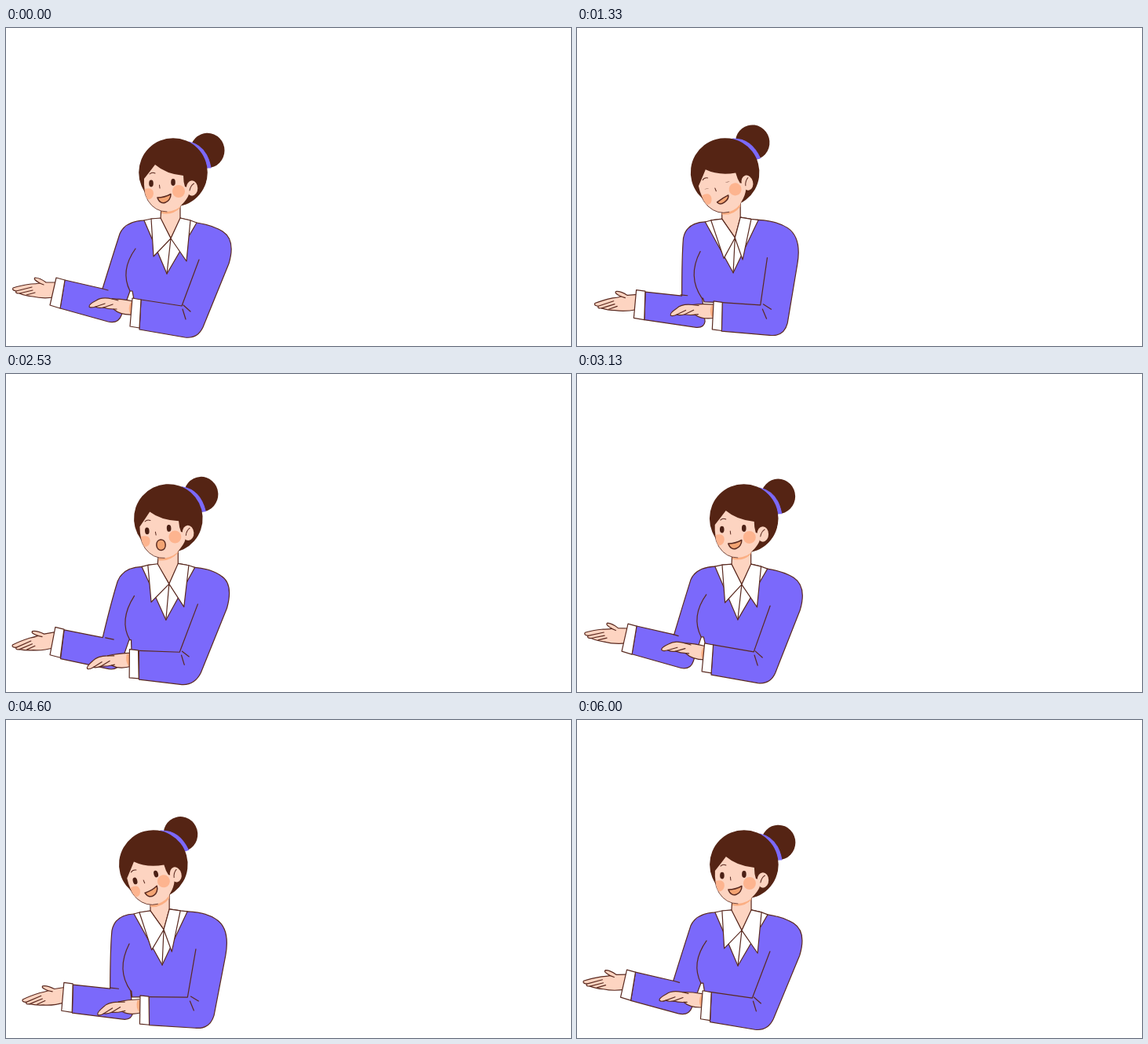
Animation of 720 by 405 pixels, one loop 6060 ms. Source, as an HTML page:

```html
<!DOCTYPE html>
<html lang="en">
<head>
<meta charset="utf-8">
<title>Presenter</title>
<style>
  html, body { margin: 0; width: 100%; height: 100%; overflow: hidden; background: #fff; }
  svg { display: block; width: 100vw; height: 100vh; }
  path, ellipse, circle { stroke-linejoin: round; stroke-linecap: round; }
</style>
</head>
<body>
<svg id="stage" viewBox="0 0 720 405"></svg>
<script>
const NS = 'http://www.w3.org/2000/svg';
const PURPLE = '#7b69fb', LINE = '#5a2a20', HAIR = '#552414', SKIN = '#fdd4c1', BLUSH = '#fdb48f', SHADE = '#fbae82';
const PERIOD = 3030;
const stage = document.getElementById('stage');

function make(parent, tag, attrs) {
  const el = document.createElementNS(NS, tag);
  for (const key in attrs) el.setAttribute(key, attrs[key]);
  return parent.appendChild(el);
}
const draw = (parent, d, fill = 'none', stroke = LINE, width = 1.2) =>
  make(parent, 'path', { d, fill, stroke, 'stroke-width': width });

// Weighted blend of paths that share the same commands.
const NUMBER = /-?\d+(\.\d+)?/g;
function blend(paths, weights) {
  const values = paths.map(p => p.match(NUMBER).map(Number));
  let i = 0;
  return paths[0].replace(NUMBER, () => {
    const v = values.reduce((sum, list, k) => sum + list[i] * weights[k], 0);
    i++;
    return v.toFixed(2);
  });
}

// Every moving shape has three poses: leaning right, swinging back, leaning left.
const morphs = [];
function morph(fill, stroke, ...poses) {
  morphs.push({ el: draw(stage, poses[0], fill, stroke), poses });
}

// Rigid parts move by [dx, dy, angle] about a centre.
const rigids = [];
function rigid(cx, cy, ...poses) {
  const el = make(stage, 'g', {});
  rigids.push({ el, cx, cy, poses });
  return el;
}

// Body and sleeves
morph(PURPLE, LINE,
  'M176 245Q152 246 145 262Q136 290 123 332L75 321L69 357L130 374Q143 377 147 366L158 335L161 335L163 346L172 346L170 384L228 394Q244 396 251 381L284 300Q293 270 276 259Q263 251 243 248Z',
  'M170 246Q146 247 141 264Q136 290 130 335L84 327L80 362L146 378Q157 379 158 370L160 338L162 338L165 341L183 343L180 381L245 391Q261 393 265 378L284 302Q291 271 273 258Q259 250 237 247Z',
  'M163 247Q139 248 135 268Q133 290 133 342L86 337L85 373L148 381Q160 383 162 374L159 345L160 345L161 352L183 352L183 388L242 392Q261 394 266 376L280 300Q286 266 268 254Q255 245 231 244Z');
morph('none', LINE,
  'M123 332L130 334M165 281Q145 309 158 335',
  'M126 334L131 335M161 282Q143 310 159 338',
  'M133 341L143 342M157 285Q140 318 159 345');
morph('none', LINE,
  'M172 346L224 354L246 295M226 353L235 361M225 358L229 371',
  'M183 343L233 353L245 295M235 352L245 360M234 358L239 371',
  'M183 352L232 353L242 292M236 352L246 358M235 358L240 370');

// Shirt, neck and collar
morph('#fff', LINE,
  'M176 245L185 243L222 242L235 245L243 248L205 313Z',
  'M170 246L179 244L215 242L228 245L237 247L202 312Z',
  'M163 247L170 245L208 241L222 243L231 244L199 312Z');
morph(SKIN, LINE,
  'M198 226L197 243L210 268L222 243L222 222',
  'M192 226L192 243L206 268L215 242L215 222',
  'M184 228L184 243L201 267L208 241L208 220');
morph(SHADE, 'none',
  'M198 226L198 236Q212 239 222 229L222 222Z',
  'M192 226L192 236Q206 239 215 229L215 222Z',
  'M184 228L184 238Q199 239 208 227L208 220Z');
morph('#fff', LINE,
  'M185 243L188 291L210 268L197 242ZM222 242L210 268L230 297L235 245ZM210 268L205 313',
  'M179 244L190 293L206 268L192 243ZM215 242L206 268L220 296L228 245ZM206 268L202 312',
  'M170 245L186 293L201 267L184 243ZM208 241L201 267L211 295L222 243ZM201 267L199 312');

// Far hand and cuff
const farHand = rigid(66, 337, [0, 0, 0], [10, 6.5, 5.5], [13, 16, -8]);
draw(farHand, 'M64 324L51 324Q43 318 37 318Q34 320 43 325Q38 326 32 326Q18 328 9 331Q7 334 13 335Q11 338 17 338Q24 341 34 342Q46 345 62 343', SKIN);
draw(farHand, 'M43 325L48 327M13 335L33 330M17 338L34 334M26 340L37 337');
const farCuff = rigid(66, 337, [0, 0, 0], [10, 6.5, -3.5], [13, 16, -8]);
draw(farCuff, 'M64 318L75 321L69 357L56 353Z', '#fff');

// Near hand and cuff
const nearHand = rigid(165, 363, [0, 0, 0], [11.2, -3, 7], [12, 6, -12]);
draw(nearHand, 'M162 348Q147 345 135 345Q122 342 115 347Q105 352 106 355Q108 357 114 355Q117 357 124 356Q130 358 137 358Q146 366 162 365', SKIN);
draw(nearHand, 'M114 355L126 351M124 356L136 352M137 358L141 358M135 345L143 347');
draw(nearHand, 'M159 349Q155 357 158 364L163 364L163 349Z', SHADE, 'none');
const nearCuff = rigid(165, 363, [0, 0, 0], [11.2, -3, 2.5], [12, 6, -3.5]);
draw(nearCuff, 'M161 344L172 346L170 382L158 380Z', '#fff');

// Head
const head = make(stage, 'g', {});
make(head, 'ellipse', { cx: 256.7, cy: 156, rx: 21.8, ry: 22.3, fill: HAIR });
draw(head, 'M233 145Q256 150 261 178L255.5 178Q251 156 233 150Z', PURPLE, PURPLE, 1);
make(head, 'circle', { cx: 213, cy: 184, r: 43.8, fill: HAIR });
draw(head, 'M176 192Q175 207 181 220Q190 234 205 234Q218 233 224 225Q231 218 233 212L231 203L228 202Q226 196 226 188Q204 186 190 174Q184 182 176 192Z', SKIN, 'none');
draw(head, 'M176 206Q177 213 181 220Q190 234 205 234', 'none', LINE, 0.8);
make(head, 'ellipse', { cx: 237, cy: 204, rx: 7.3, ry: 9.7, fill: SKIN });
draw(head, 'M239.500 198Q235 201 234 207', 'none', LINE, 1);
make(head, 'circle', { cx: 220, cy: 208, r: 8, fill: BLUSH });
draw(head, 'M176.500 205Q188 202 188 211Q187 219 180 218Q177 212 176.500 205Z', BLUSH, 'none');
draw(head, 'M183 186Q186 183 190 185M195.500 200L196 204', 'none', LINE, 1);
const eyes = [[185, 198], [213, 196.5]].map(([cx, cy]) =>
  make(head, 'ellipse', { cx, cy, rx: 2.8, ry: 4.4, fill: '#4b2015' }));
const mouth = draw(head, 'M0 0', '#f3a473', LINE, 1.5);
mouth.setAttribute('transform', 'translate(201.5 217)');

const oval = (w, h, tilt = 0) => {
  const k = h * 1.33;
  return `M${-w} ${tilt}C${-w} ${tilt - k} ${w} ${-tilt - k} ${w} ${-tilt}C${w} ${k - tilt} ${-w} ${k + tilt} ${-w} ${tilt}Z`;
};
const smile = 'M-8.5 -1C-3 -1 4 -3 8.5 -5.5C9 5 -5 11 -8.5 -1Z';
const slim = 'M-8 1C-3 -1 3 -3 8 -4C8 2 -5 8 -8 1Z';
const speech = [
  [0, smile], [120, smile], [620, oval(6.5, 3, 1)], [760, oval(6.5, 3, 1)],
  [1330, slim], [1570, smile], [1680, smile], [2100, oval(7, 5.5, 0.5)],
  [2530, oval(5.7, 6.8)], [2900, smile], [PERIOD, smile]
];
function mouthShape(t) {
  const i = speech.findIndex(key => key[0] > t);
  const [t0, from] = speech[i - 1], [t1, to] = speech[i];
  const k = (t - t0) / (t1 - t0);
  return blend([from, to], [1 - k, k]);
}

function render(time) {
  const t = time % PERIOD;
  const phase = t / PERIOD * 2 * Math.PI;
  const c = Math.cos(phase), s = Math.sin(phase);
  const weights = [0.5 + 0.5 * c - 0.56 * s, s, 0.5 - 0.5 * c - 0.44 * s];

  for (const { el, poses } of morphs) el.setAttribute('d', blend(poses, weights));
  for (const { el, cx, cy, poses } of rigids) {
    const [dx, dy, angle] = [0, 1, 2].map(i => poses.reduce((sum, p, k) => sum + p[i] * weights[k], 0));
    el.setAttribute('transform', `translate(${dx} ${dy}) rotate(${angle} ${cx} ${cy})`);
  }

  const lean = (1 - c) / 2;
  head.setAttribute('transform', `translate(${-25.3 * lean} 0) rotate(${-15.5 * lean} 213 184)`);
  mouth.setAttribute('d', mouthShape(t));

  const open = Math.min(1, Math.max(0.08, (Math.abs(t - 1335) - 35) / 80));
  for (const eye of eyes) {
    eye.setAttribute('ry', 4.4 * open);
    eye.setAttribute('fill-opacity', open < 0.2 ? 0.6 : 1);
  }
}

const start = performance.now();
function tick() {
  render(performance.now() - start);
  requestAnimationFrame(tick);
}
render(0);
requestAnimationFrame(tick);
</script>
</body>
</html>
```
